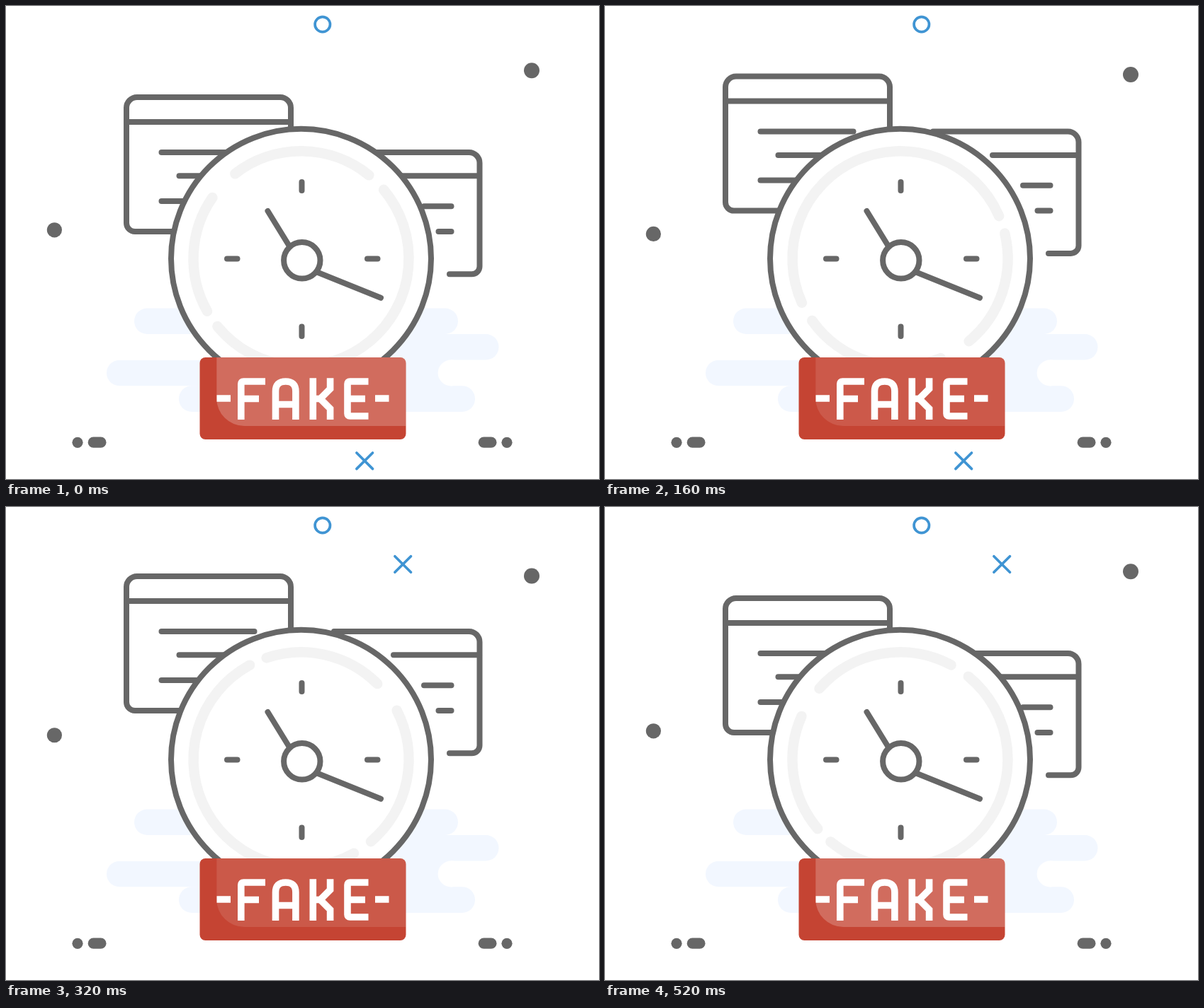
These frames come from a looping animation (837 by 669 pixels, 560 ms). An HTML page with a canvas:

```html
<!DOCTYPE html>
<html lang="en">
<head>
<meta charset="utf-8">
<title>Fake clock</title>
<style>
  html, body { margin: 0; width: 100%; height: 100%; overflow: hidden; background: #fff; }
  canvas { display: block; }
</style>
</head>
<body>
<canvas id="stage" width="837" height="669"></canvas>
<script>
const ctx = document.getElementById('stage').getContext('2d');
const GREY = '#676767', BLUE = '#3f94d3', CLOUD = '#f2f7ff', RED = '#c54433';
const STEP = 40, LOOP = 560, HALF = 244.4;
const CX = 416.5, CY = 357.3;
const rad = deg => deg * Math.PI / 180;

function pen(color, width, cap = 'round') {
  ctx.strokeStyle = color;
  ctx.lineWidth = width;
  ctx.lineCap = cap;
  ctx.lineJoin = cap === 'round' ? 'round' : 'miter';
}

function line(x1, y1, x2, y2) {
  ctx.beginPath();
  ctx.moveTo(x1, y1);
  ctx.lineTo(x2, y2);
  ctx.stroke();
}

function disc(x, y, r, color) {
  ctx.beginPath();
  ctx.arc(x, y, r, 0, 7);
  ctx.fillStyle = color;
  ctx.fill();
}

function ring(x, y, r) {
  ctx.beginPath();
  ctx.arc(x, y, r, 0, 7);
  ctx.stroke();
}

function box(x, y, right, bottom, radii, color) {
  ctx.beginPath();
  ctx.roundRect(x, y, right - x, bottom - y, radii);
  ctx.fillStyle = color;
  ctx.fill();
}

function clouds() {
  box(181, 427.5, 638, 464, 18.2, CLOUD);
  box(300, 464, 695.5, 500.5, 18.2, CLOUD);
  box(142, 501, 628, 537.2, [18, 0, 0, 18], CLOUD);
  box(244, 537.2, 662, 574, 18.3, CLOUD);
  ctx.fillStyle = CLOUD;
  ctx.fillRect(300, 499, 328, 40);
  disc(628, 519, 18.4, '#fff');
}

function windows(dy) {
  ctx.save();
  ctx.translate(0, dy);
  pen(GREY, 8);

  ctx.beginPath();
  ctx.moveTo(402, 206);
  ctx.lineTo(402, 145);
  ctx.arcTo(402, 129, 386, 129, 15);
  ctx.lineTo(186, 129);
  ctx.arcTo(170, 129, 170, 145, 15);
  ctx.lineTo(170, 303);
  ctx.arcTo(170, 319, 182, 319, 12);
  ctx.lineTo(300, 319);
  ctx.stroke();
  line(170, 164, 402, 164);
  line(219.5, 207, 350.5, 207);
  line(244.5, 240.3, 335, 240.3);
  line(219.5, 276, 310, 276);

  ctx.beginPath();
  ctx.moveTo(463, 207);
  ctx.lineTo(652, 207);
  ctx.arcTo(668.5, 207, 668.5, 223, 15);
  ctx.lineTo(668.5, 365);
  ctx.arcTo(668.5, 379.3, 656, 379.3, 11);
  ctx.lineTo(626, 379.3);
  ctx.stroke();
  line(547, 240.3, 668, 240.3);
  line(590, 283.2, 628.5, 283.2);
  line(610.5, 319, 628.5, 319);
  ctx.restore();
}

function clock(turn) {
  disc(CX, CY, 183.5, '#fff');
  pen('#f3f3f3', 14.5);
  for (const [from, to] of [[-39.9, 141], [150.7, 214.6], [-127.8, -50.9]]) {
    ctx.beginPath();
    ctx.arc(CX, CY, 152, rad(from + turn), rad(to + turn));
    ctx.stroke();
  }
  pen(GREY, 8);
  ring(CX, CY, 183.5);
  line(417.5, 249, 417.5, 261);
  line(417.5, 453.5, 417.5, 467);
  line(312, 357.5, 326.5, 357.5);
  line(510, 357.5, 524.5, 357.5);
  line(369.5, 290, 402, 343);
  line(438, 376, 529, 412.8);
  disc(417.8, 359.8, 25.7, '#fff');
  ring(417.8, 359.8, 25.7);
}

function lettering() {
  pen('#fff', 9.6, 'butt');
  ctx.stroke(new Path2D(
    'M297.5 555H317M521 555H540.5' +
    'M331.8 585V534.5Q331.8 531 335.3 531H366M331.8 555.5H357' +
    'M380.5 585V545Q380.5 531 394.7 531Q408.9 531 408.9 545V585M380.5 563.5H409' +
    'M433.3 526.3V585M457.6 526.3V541.5L443.5 555.5L457.6 569.5V585M433.3 555.5H443.5' +
    'M511.5 531H485.5Q482 531 482 534.5V576.5Q482 580 485.5 580H511.5M482 555.5H507'
  ));
}

function badge(gloss) {
  box(273.5, 497, 564.5, 613, 8, RED);
  box(297.3, 497, 564.5, 594, [0, 8, 0, 39], `rgba(255,255,255,${gloss})`);
  lettering();
}

function cross(x, y) {
  line(x - 11.3, y - 11.3, x + 11.3, y + 11.3);
  line(x - 11.3, y + 11.3, x + 11.3, y - 11.3);
}

function draw(t) {
  const rising = t < HALF;
  const lift = Math.max(0, 1 - Math.abs(t - HALF) / HALF);
  const turn = rising
    ? -1.027 * t
    : -10.8 + 360 * Math.min(1, (t - HALF) / HALF);

  ctx.fillStyle = '#fff';
  ctx.fillRect(0, 0, 837, 669);
  clouds();
  windows(-44.9 * lift);
  clock(turn);
  badge(0.21 - 0.145 * lift);

  disc(742, 91.2 + 9 * lift, 11, GREY);
  disc(68.4, 316.8 + 8.6 * lift, 10.6, GREY);
  disc(101, 617.3, 7.6, GREY);
  disc(707, 617.3, 7.6, GREY);
  box(115.7, 609.6, 141.5, 624.8, 7.6, GREY);
  box(666.7, 609.6, 692.5, 624.8, 7.6, GREY);

  pen(BLUE, 3.7);
  ring(446.8, 26, 10.7);
  if (rising) cross(506.2, 643.3);
  else cross(560.2, 81);
}

function tick() {
  const t = performance.now() % LOOP;
  draw(Math.floor(t / STEP) * STEP);
  requestAnimationFrame(tick);
}
tick();
</script>
</body>
</html>
```
